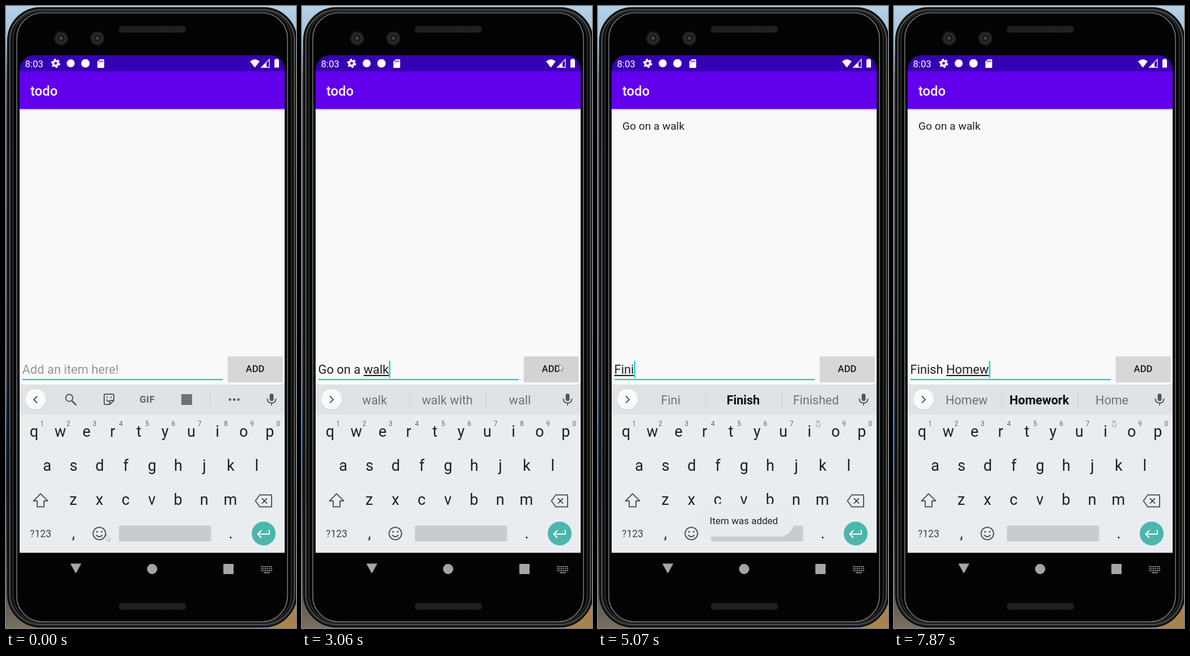
An HTML page that plays this animation: 511x1096 px, repeating every 7.99 s.

```html
<!DOCTYPE html>
<html lang="en">
<head>
<meta charset="utf-8">
<title>todo</title>
<style>
  html, body { margin: 0; width: 100%; height: 100%; overflow: hidden; background: #000; }
  svg { display: block; width: 100vw; height: 100vh; }
  text { font-family: Roboto, sans-serif; white-space: pre; }
  .mid { text-anchor: middle; }
  .key { font-size: 27px; fill: #14232b; }
  .num { font-size: 12px; fill: #5d686f; }
  .field { font-size: 21.8px; }
  .hint { font-size: 21.5px; fill: #6a7378; }
  .line { fill: none; stroke: #4c5a62; stroke-width: 2; stroke-linecap: round; stroke-linejoin: round; }
</style>
</head>
<body>
<svg viewBox="0 0 511 1096">
  <defs>
    <linearGradient id="edge" x1="0" y1="0" x2="0" y2="1">
      <stop offset="0" stop-color="#b3d0e8"/><stop offset=".05" stop-color="#a9c4d8"/>
      <stop offset=".12" stop-color="#5e6c74"/><stop offset=".6" stop-color="#4a5660"/>
      <stop offset=".68" stop-color="#1f3f6b"/><stop offset=".76" stop-color="#22303f"/>
      <stop offset=".95" stop-color="#5b5852"/><stop offset="1" stop-color="#77705f"/>
    </linearGradient>
    <linearGradient id="shade" x1="0" y1="0" x2="0" y2="1">
      <stop offset="0" stop-color="#000" stop-opacity=".16"/><stop offset="1" stop-color="#000" stop-opacity="0"/>
    </linearGradient>
    <pattern id="mesh" width="4" height="4" patternUnits="userSpaceOnUse">
      <rect width="4" height="4" fill="#191919"/><path d="M0 1h2M2 3h2" stroke="#333"/>
    </pattern>
    <g id="lens">
      <circle r="12.5" fill="#1b1b1b"/><circle r="10" fill="#292b2c"/>
      <circle r="6.5" fill="#151819"/><circle r="3.4" fill="#32383c"/><circle cx="-1" cy="-1" r="1.5" fill="#525c61"/>
    </g>
  </defs>

  <!-- Device, its right edge just beyond the stage -->
  <rect width="511" height="1096" fill="url(#edge)"/>
  <path d="M440 1096H511V1030Z" fill="#a6834f"/>
  <rect x="3" y="3" width="509" height="1091" rx="58" fill="#1a1c1c" stroke="#0a0b0b" stroke-width="2"/>
  <rect x="7" y="7" width="501" height="1083" rx="54" fill="#080808" stroke="#505353" stroke-width="2"/>
  <rect x="12" y="9" width="491" height="1078" rx="50" fill="#020202" stroke="#232525" stroke-width="3"/>
  <rect x="19" y="12" width="477" height="1073" rx="45" fill="#030303" stroke="#737676" stroke-width="1.6"/>
  <rect x="21" y="14" width="473" height="1069" rx="43" fill="#030303"/>
  <rect x="199" y="35" width="118" height="12" rx="5" fill="url(#mesh)"/>
  <rect x="199" y="1052" width="118" height="12" rx="5" fill="url(#mesh)"/>
  <use href="#lens" x="97" y="57"/><use href="#lens" x="161" y="57"/>

  <!-- App -->
  <rect x="24" y="181" width="467" height="486" fill="#f9f9f9"/>
  <path d="M24 115V112A26 26 0 0 1 50 86.500H465A26 26 0 0 1 491 112V115Z" fill="#3700b3"/>
  <rect x="24" y="115" width="467" height="66.500" fill="#6200ee"/>
  <rect x="24" y="181.500" width="467" height="3.500" fill="url(#shade)"/>
  <text x="33.500" y="107.500" font-size="16.700" fill="#fff">8:03</text>
  <text x="43" y="158" font-size="23.800" font-weight="500" fill="#fff">todo</text>
  <g fill="#fff">
    <circle cx="87.500" cy="101" r="4.200" fill="none" stroke="#fff" stroke-width="3.600"/>
    <circle cx="87.500" cy="101" r="6.800" fill="none" stroke="#fff" stroke-width="2.400" stroke-dasharray="3.700 3.420"/>
    <circle cx="114" cy="101" r="7"/><circle cx="140" cy="101" r="7.500"/>
    <path d="M165 94H172Q173 94 173 95V107.500Q173 109 171.500 109H162.500Q161 109 161 107.500V98Z"/>
    <path d="M430 97.500Q438.500 90.500 447 97.500L438.500 108.500Z"/>
    <path d="M464 94V108H450Z" fill="none" stroke="#fff" stroke-width="1.300"/>
    <path d="M459 99V108H450Z"/>
    <path d="M475 94.500V93H479V94.500H481V108.500H473V94.500Z"/>
  </g>
  <path d="M164.500 96V99M167.300 96V99M170.100 96V99" stroke="#3700b3" stroke-width="1.400"/>
  <text id="item" x="43" y="218" font-size="19.200" fill="#222">Go on a walk</text>
  <text id="empty" class="field" x="28.600" y="648" fill="#969696">Add an item here!</text>
  <text id="field" class="field" x="28.600" y="648" fill="#212121"><tspan id="done"></tspan><tspan id="word" text-decoration="underline"></tspan></text>
  <rect x="29" y="657" width="353" height="2.300" fill="#0ed7cb"/>
  <rect id="caret" y="625.500" width="2.400" height="30" fill="#0ed7cb"/>
  <rect x="390.500" y="618" width="97" height="45.500" rx="3" fill="#000" opacity=".13"/>
  <rect id="button" x="391" y="617.500" width="96" height="43.500" rx="2"/>
  <text class="mid" x="439" y="645.300" font-size="16.700" font-weight="500" fill="#1b1b1b">ADD</text>

  <!-- Keyboard -->
  <rect x="24" y="667" width="467" height="296.500" fill="#e9edf0"/>
  <rect x="24" y="667" width="467" height="53" fill="#dfe3e6"/>
  <circle cx="52" cy="694" r="18.300" fill="#000" opacity=".1"/>
  <circle cx="52" cy="693" r="18" fill="#fafafa"/>
  <path id="chevron" class="line"/>
  <g id="tools" class="line">
    <circle cx="111.500" cy="690.500" r="6.200"/><path d="M116 695.500L123 702.500" stroke-width="2.600"/>
    <path d="M190 695V686Q190 684 188 684H175Q173 684 173 686V700Q173 702 175 702H183L190 695H185Q183 695 183 697V702M177.500 694Q179 697 182 696.500"/>
    <path d="M178 689.500H178.100M185 689.500H185.100" stroke-width="2.600"/>
    <text class="mid" x="249" y="699" font-size="16.500" font-weight="700" fill="#56636a" stroke="none" letter-spacing=".7">GIF</text>
    <rect x="309" y="684" width="19" height="19" fill="#68747a" stroke="none"/>
    <path d="M359.500 680V707" stroke="#c9cdd0" stroke-width="1"/>
    <path d="M394.500 693.500H394.600M402 693.500H402.100M409.500 693.500H409.600" stroke-width="4.400"/>
  </g>
  <g id="hints">
    <path d="M189.500 680V708M324.500 680V708" stroke="#c3c8cb"/>
    <text class="hint mid" x="128" y="702"></text>
    <text class="hint mid" x="256" y="702"></text>
    <text class="hint mid" x="384" y="702"></text>
  </g>
  <rect x="464.500" y="683" width="7" height="13" rx="3.500" fill="#4c5a62"/>
  <path class="line" d="M460.500 692.500Q461 699.500 468 699.500T475.500 692.500M468 700V703"/>
  <g id="keys"></g>
  <path class="line" d="M61 859.500L73.500 872H67V882.500H55V872H48.500Z"/>
  <path class="line" d="M447 861.500H468V882.500H447L439.500 872ZM451.500 868L459.500 876M459.500 868L451.500 876"/>
  <text class="mid" x="61" y="936" font-size="17.500" fill="#37474f">?123</text>
  <text class="key mid" x="119" y="938">,</text>
  <text class="key mid" x="396" y="938">.</text>
  <circle class="line" cx="164.500" cy="929.500" r="11"/>
  <path class="line" d="M160.500 926.500H160.600M168.500 926.500H168.600" style="stroke-width:3.200"/>
  <path class="line" d="M159.500 932.500Q164.500 938 169.500 932.500"/>
  <rect x="199" y="915.500" width="162.500" height="28" rx="3" fill="#c8ccd0"/>
  <circle cx="454" cy="929.500" r="21" fill="#4db6ac"/>
  <path class="line" d="M464 924V930.500H444M449.500 924.500L443.500 930.500L449.500 936.500" style="stroke:#fff"/>

  <!-- Navigation -->
  <g fill="#a5a5a5">
    <path d="M114 983H132L123 999Z" stroke="#a5a5a5" stroke-linejoin="round"/>
    <circle cx="257.500" cy="992" r="9"/><rect x="383" y="983" width="18" height="18" rx="1"/>
    <path d="M450 988H469M450 991.500H469M450 995H469" stroke="#a5a5a5" stroke-width="2" stroke-dasharray="2 1.400"/>
    <path d="M454 998.500H465" stroke="#a5a5a5" stroke-width="1.600"/>
  </g>

  <g id="toast">
    <rect x="171" y="877" width="175" height="58" rx="27" fill="#e9ecee"/>
    <text class="mid" x="257" y="913" font-size="17" fill="#222">Item was added</text>
  </g>
  <path id="mouse" d="M0 0V11.500L2.700 9L4.600 13.300L6.400 12.500L4.600 8.400H8.200Z" stroke="#555" stroke-width=".7"/>
</svg>
<script>
const LOOP = 7990;
const $ = id => document.getElementById(id);
const hintTexts = [...document.querySelectorAll('.hint')];

// time, committed text, word being composed, suggestions, bold middle
const typing = [
  [0, '', '', ''],
  [150, '', 'Go', ''],
  [430, 'Go ', '', 'to|back|for'],
  [830, 'Go ', 'o', 'o|on|out', 1],
  [950, 'Go ', 'on', 'on|one|only'],
  [1100, 'Go on ', '', 'the|a|my'],
  [1220, 'Go on ', 'a', 'a|an|and'],
  [1370, 'Go on a ', '', 'a|an|and'],
  [1520, 'Go on a ', '', 'walk|date|trip'],
  [1640, 'Go on a ', 'w', 'w|walk|with', 1],
  [1790, 'Go on a ', 'wa', 'wa|walk|was', 1],
  [1940, 'Go on a ', 'wal', 'wal|walk|wall', 1],
  [2090, 'Go on a ', 'walk', 'walk|walk with|wall'],
  [3600, '', '', 'walk|walk with|wall'],
  [4710, '', 'F', 'F|For|From', 1],
  [4830, '', 'Fi', 'Fi|First|Find', 1],
  [4950, '', 'Fin', 'Fin|Find|Fine', 1],
  [5070, '', 'Fini', 'Fini|Finish|Finished', 1],
  [5350, '', 'Finis', 'Finis|Finish|Finished', 1],
  [5500, '', 'Finish', 'Finish|Finished|Finishing'],
  [5900, 'Finish ', '', 'the|it|your'],
  [6140, 'Finish ', 'H', 'H|How|Home', 1],
  [6530, 'Finish ', 'Ho', 'Ho|How|Home', 1],
  [7050, 'Finish ', 'Hom', 'Hom|Homework|Home', 1],
  [7750, 'Finish ', 'Home', 'Home|Homework|Home', 1],
  [7870, 'Finish ', 'Homew', 'Homew|Homework|Home', 1]
];
const pointer = [
  [0, 177, 931], [2520, 240, 850], [2670, 370, 660], [2790, 480, 520], [2940, 500, 478],
  [3060, 453, 631], [3600, 462, 636], [3750, 486, 648], [3870, 496, 654],
  [4020, 478, 668], [4150, 435, 700], [4290, 400, 724], [4440, 385, 730]
];
const toast = [[0, 0], [4020, .3], [4150, .75], [4290, 1], [5900, .75], [6020, .45], [6140, .2], [6260, 0]];
const caretOff = [[0, 150], [2520, 3060], [3480, 3600], [4290, 4710], [7480, 7750]];

const at = (steps, t) => steps.findLast(s => s[0] <= t);
const within = (t, a, b) => t >= a && t < b;
const show = (el, on) => el.style.display = on ? '' : 'none';

function addKey(cls, x, y, label) {
  const el = document.createElementNS('http://www.w3.org/2000/svg', 'text');
  el.setAttribute('class', cls + ' mid');
  el.setAttribute('x', x);
  el.setAttribute('y', y);
  el.textContent = label;
  $('keys').append(el);
  return el;
}
const letters = [];
[['qwertyuiop', 49.5, 759], ['asdfghjkl', 72.7, 819], ['zxcvbnm', 118.5, 879]].forEach(([row, x, y]) =>
  [...row].forEach((c, i) => letters.push([addKey('key', x + i * 46.15, y, c), c])));
[...'1234567890'].forEach((c, i) => addKey('num', 63.5 + i * 46.25, 740, c));

function draw(t) {
  const [, done, word, hints, bold] = at(typing, t);
  $('done').textContent = done;
  $('word').textContent = word;
  show($('empty'), !(done + word));
  const width = done + word ? $('field').getComputedTextLength() : 0;
  $('caret').setAttribute('x', 28.8 + width);
  show($('caret'), !caretOff.some(([a, b]) => within(t, a, b)));

  show($('tools'), !hints);
  show($('hints'), hints);
  hints.split('|').forEach((s, i) => hintTexts[i].textContent = s);
  hintTexts[1].style.fontWeight = bold ? 700 : 400;
  hintTexts[1].style.fill = bold ? '#0b0b0b' : '';
  $('chevron').setAttribute('d', hints ? 'M49.5 688L55 693.500L49.5 699' : 'M54.5 688L49 693.500L54.5 699');

  const caps = within(t, 6020, 6260);
  letters.forEach(([el, c]) => el.textContent = caps ? c.toUpperCase() : c);

  const [, mx, my] = at(pointer, t);
  const blended = my > 725;
  $('mouse').setAttribute('transform', `translate(${mx} ${my})`);
  $('mouse').setAttribute('fill', blended ? '#e9edf0' : '#f5f5f5');
  $('mouse').setAttribute('stroke-dasharray', blended ? '1.5 1.5' : 'none');
  $('button').setAttribute('fill', within(t, 3330, 4020) ? '#cccecc' : within(t, 3060, 3330) ? '#d2d3d2' : '#d6d7d6');
  show($('item'), t >= 4020);
  $('toast').setAttribute('opacity', at(toast, t)[1]);
}

const start = performance.now();
function tick() {
  draw((performance.now() - start) % LOOP);
  requestAnimationFrame(tick);
}
tick();
</script>
</body>
</html>
```
